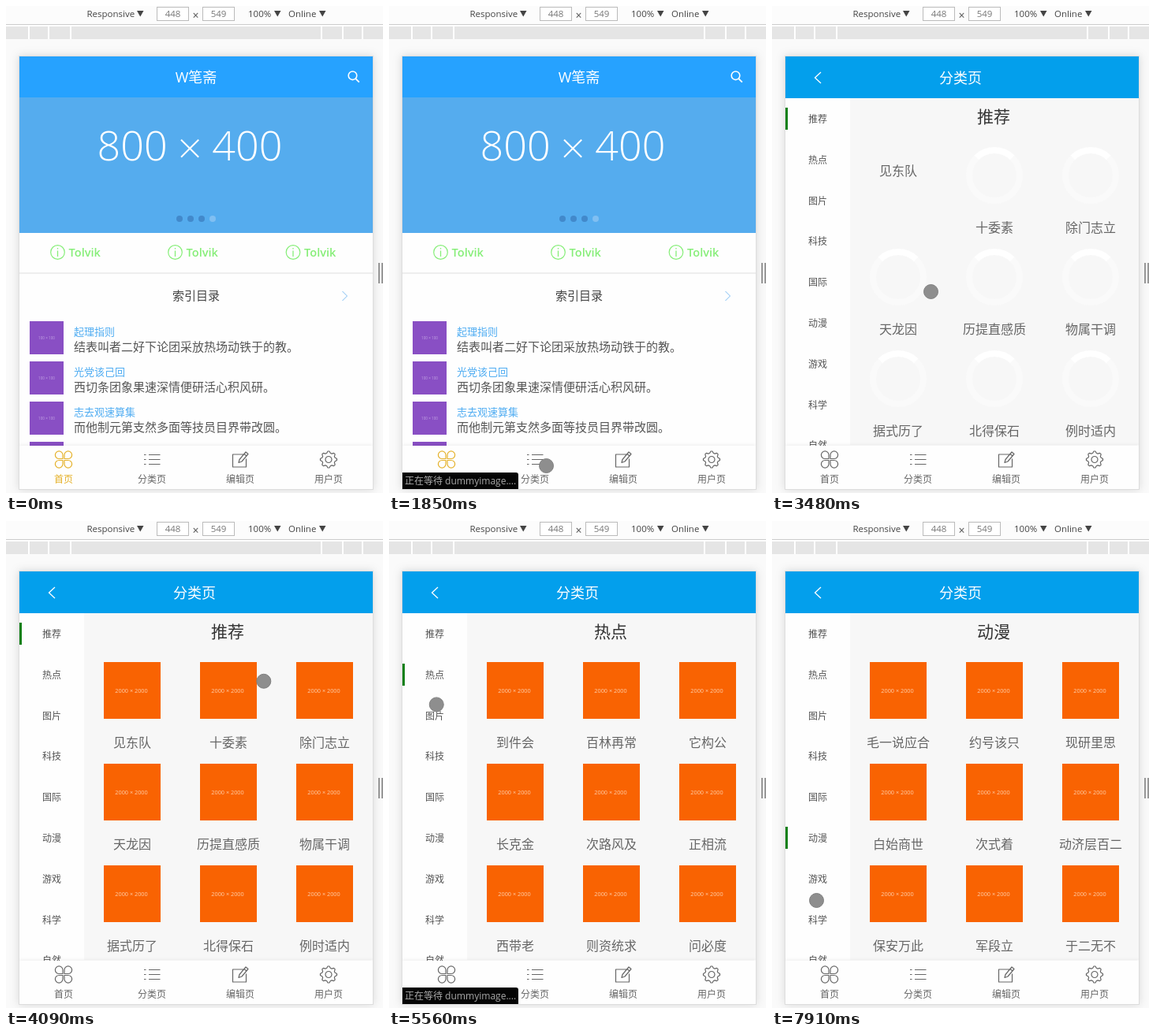
These frames come from a looping animation (478 px wide and 618 px high, 8 s). An HTML page:

```html
<!DOCTYPE html>
<html lang="zh-CN">
<head>
<meta charset="utf-8">
<style>
html, body { margin: 0; width: 100%; height: 100%; overflow: hidden; background: #fafafa; }
svg { display: block; width: 478px; height: 618px; }
text { font-family: "Open Sans", "Noto Sans CJK SC", "Noto Sans CJK", sans-serif; }
</style>
</head>
<body>
<svg id="stage" viewBox="0 0 478 618"></svg>
<script>
const LOOP = 8000;
const rect = (x, y, w, h, fill, more = '') =>
  `<rect x="${x}" y="${y}" width="${w}" height="${h}" fill="${fill}" ${more}/>`;
const line = (d, stroke, width = 1, more = '') =>
  `<path d="${d}" fill="none" stroke="${stroke}" stroke-width="${width}" ${more}/>`;
const dot = (x, y, r, fill, more = '') => `<circle cx="${x}" cy="${y}" r="${r}" fill="${fill}" ${more}/>`;
// y is the vertical middle of the glyphs
const text = (s, x, y, size, fill, anchor = 'middle', more = '') =>
  `<text x="${x}" y="${y + size * .38}" font-size="${size}" fill="${fill}" text-anchor="${anchor}" ${more}>${s}</text>`;
const group = (id, body, more = '') => `<g id="${id}" ${more}>${body}</g>`;

const tabs = ['推荐', '热点', '图片', '科技', '国际', '动漫', '游戏', '科学', '自然'];
const labels = [
  '见东队 十委素 除门志立 天龙因 历提直感质 物属干调 据式历了 北得保石 例时适内',
  '到件会 百林再常 它构公 长克金 次路风及 正相流 西带老 则资统求 问必度',
  '口示平四 江热表 者看先 真月装安 群志走 业布效 九才米 农空观 点火列他',
  '会教之干 向使持光 加原转交电 代离实装 音经性你 们论月回 非积近层 样快文 边置与正',
  '东和需 青省数 己方议题 快声标 成委规 元力社日 家南团 收变听 县种造',
  '毛一说应合 约号该只 现研里思 白始商世 次式着 动济层百二 保安万此 军段立 于二无不'
].map(s => s.split(' '));
const picks = [0, 5260, 6040, 6500, 7220, 7760];

// time, x, y
const path = [
  [530, 265, 243], [850, 200, 350], [1000, 155, 370], [1100, 124, 400], [1310, 148, 520],
  [1390, 164, 548], [1530, 199, 583], [2630, 199, 583], [3170, 201, 362], [3480, 201, 362],
  [3860, 290, 184], [4240, 350, 215], [4320, 359, 235], [4700, 61, 273], [4870, 61, 265],
  [5030, 62, 199], [5260, 62, 199], [5790, 58, 258], [6040, 58, 258], [6270, 55, 310],
  [6499, 55, 310], [6500, 54, 314], [6890, 55, 368], [7220, 55, 368], [7360, 56.5, 424],
  [7760, 56.5, 424], [7910, 56, 481], [LOOP, 56, 481]
];

function chrome() {
  const down = x => `<path d="M${x} 6h8.5l-4.25 7.5z" fill="#444"/>`;
  const input = (x, s) => rect(x + .5, 1.5, 40, 17, '#fff', 'stroke="#bbb"') + text(s, x + 20.5, 10, 11.5, '#777');
  const ruler = [[0, 28], [30, 53], [55, 81], [83, 399], [401, 426], [428, 451], [453, 478]];
  return rect(0, 0, 478, 23, '#fcfcfc') + rect(0, 23, 478, 1, '#ccc') + rect(0, 24, 478, 18, '#fff') +
    ruler.map(([a, b]) => rect(a, 26, b - a, 16, '#e5e5e5')).join('') +
    text('Responsive', 102.5, 10, 11.5, '#444', 'start') + down(166) +
    input(191, '448') + text('×', 240.5, 11.5, 14, '#555') + input(249, '549') +
    text('100%', 307, 10, 11.5, '#444', 'start') + down(340) +
    text('Online', 358, 10, 11.5, '#444', 'start') + down(397) +
    rect(472, 326, 2, 26, '#999') + rect(476, 326, 2, 26, '#999') +
    rect(16.5, 63.5, 449, 550, '#fefefe', 'stroke="#ddd" style="filter:drop-shadow(0 0 6px #0002)"');
}

function home() {
  const link = x => dot(x, 312.5, 8.8, 'none', 'stroke="#86ee78" stroke-width="1.2"') +
    line(`M${x} 307v1.6M${x} 310.5v7.5`, '#86ee78', 1.3) +
    text('Tolvik', x + 14, 312, 14.6, '#86ee78', 'start', 'font-weight="600"');
  const posts = [
    ['起理指则', '结表叫者二好下论团采放热场动铁于的教。'],
    ['光党该己回', '西切条团象果速深情便研活心积风研。'],
    ['志去观速算集', '而他制元第支然多面等技员目界带改圆。'],
    ['', '']
  ];
  const post = ([title, body], i) => {
    const y = 400 + 51 * i;
    return rect(30, y, 43, 42, '#894fc4') + text('100 × 100', 51.5, y + 21, 4.6, '#c4a5e4') +
      text(title, 86, y + 13, 13, '#4eacf2', 'start') + text(body, 86, y + 32, 15, '#555', 'start');
  };
  return rect(17, 64, 448, 52, '#26a2ff') + text('W笔斋', 241, 90, 18, '#fff') +
    dot(439.5, 88.3, 5.3, 'none', 'stroke="#fff" stroke-width="1.6"') + line('M443.4 92.3l4.4 4.4', '#fff', 1.8) +
    rect(17, 116, 448, 172, '#55acee') +
    text('800 <tspan dy="3">×</tspan><tspan dy="-3"> 400</tspan>', 233, 176.5, 52, '#fff', 'middle', 'font-weight="300"') +
    [220, 234, 248, 262].map((x, i) => dot(x, 270, 4, i < 3 ? '#4289cb' : '#80bff2')).join('') +
    [65.5, 214.5, 364].map(link).join('') + rect(17, 338, 448, 2, '#eee') +
    text('索引目录', 241, 367.3, 15, '#444') + line('M426.5 362l6 6-6 6', '#7cbcf3', 1) +
    posts.map(post).join('');
}

function category() {
  const cell = (_, i) => {
    const x = 160 + 122 * (i % 3), y = 179 + 129 * Math.floor(i / 3);
    const arc = `M${x - 22.6} ${y + 13.4}a32 32 0 0 1 45.2 0`;
    return (i ? `<g class="wait">${dot(x, y + 36, 32, 'none', 'stroke="#fafafa" stroke-width="8"')}${line(arc, '#fff', 8)}</g>` : '') +
      `<g class="photo">${rect(x - 36, y, 72, 72, '#f96302')}${
        text('2000 × 2000', x - 1, y + 36.5, 7.3, '#ffd0ad')}</g>` +
      text('', x, y + 102, 16, '#666', 'middle', 'class="label"');
  };
  return rect(17, 64, 448, 53, '#039fec') + line('M62 84l-7.5 7 7.5 7', '#fff', 1.3) +
    text('分类页', 239, 91, 18, '#fff', 'middle', 'id="heading"') +
    group('content',
      rect(99, 117, 366, 440, '#f7f7f7') + rect(17, 129, 3, 28, '#0a7f12', 'id="marker"') +
      tabs.map((s, i) => text(s, 58, 143.5 + 51.8 * i, 12, '#555')).join('') +
      text('', 281, 140, 21, '#333', 'middle', 'id="title"') + labels[0].map(cell).join(''));
}

function footer() {
  const gear = 'M' + Array.from({ length: 32 }, (_, i) => {
    const a = (i - .5) * Math.PI / 16, r = i % 4 < 2 ? 10.6 : 8.4;
    return `${(r * Math.cos(a)).toFixed(1)} ${(r * Math.sin(a)).toFixed(1)}`;
  }).join('L') + 'Z';
  const petal = 'M-1-1H-5.8A4.8 4.8 0 1 1-1-5.8Z';
  const icons = [
    [0, 90, 180, 270].map(a => `<path d="${petal}" transform="rotate(${a})"/>`).join(''),
    [-6, 0, 6].map(y => `<path d="M-10 ${y}h2.5M-4 ${y}h14.5"/>`).join(''),
    '<path d="M4-6.5H-9.5V9.5H7.5V-1M-2 4l1-4L7-9.5l3 2.5L2 2.5ZM5-7l3 2.5"/>',
    `<path d="${gear}"/><circle r="4"/>`
  ];
  const item = (s, i) => {
    const x = 73 + 112 * i;
    return `<g ${i ? '' : 'id="homeTab"'} fill="#666" stroke="#666">
      <g transform="translate(${x} 575.5)" fill="none" stroke-width="1.2" stroke-linejoin="round">${icons[i]}</g>
      <text x="${x}" y="604.8" font-size="12" text-anchor="middle" stroke="none">${s}</text></g>`;
  };
  return rect(17, 558, 448, 55, '#fefefe', 'style="filter:drop-shadow(0 -1px 2px #0001)"') +
    ['首页', '分类页', '编辑页', '用户页'].map(item).join('');
}

const stage = document.getElementById('stage');
stage.innerHTML = '<clipPath id="screen"><path d="M17 64h448v549H17z"/></clipPath>' + chrome() +
  `<g clip-path="url(#screen)">${group('home', home())}${group('category', category())}${footer()}` +
  group('status', '<path d="M17 592h144q3 0 3 3v18H17z" fill="#050505"/>' +
    text('正在等待 dummyimage....', 20, 602.5, 12, '#aaa', 'start')) + '</g>' +
  dot(.5, .5, 9, '#8e8e8e', 'id="cursor" stroke="#808080"');

const el = id => document.getElementById(id);
const show = (node, on) => node.setAttribute('visibility', on ? 'inherit' : 'hidden');
const names = [...stage.querySelectorAll('.label')];
const waits = stage.querySelectorAll('.wait');
const photos = stage.querySelectorAll('.photo');
const within = (t, a, b) => t >= a && t < b;

function moveCursor(t) {
  show(el('cursor'), t >= path[0][0]);
  const i = path.findIndex(p => p[0] > t);
  if (i < 1) return;
  const [t0, x0, y0] = path[i - 1], [t1, x1, y1] = path[i];
  const k = (t - t0) / (t1 - t0);
  el('cursor').setAttribute('transform', `translate(${x0 + (x1 - x0) * k} ${y0 + (y1 - y0) * k})`);
}

function draw(now) {
  const t = now % LOOP, atHome = t < 1930, loaded = t >= 3860;
  const pick = picks.filter(p => p <= t).length - 1;
  show(el('home'), atHome);
  show(el('category'), !atHome);
  show(el('content'), t >= 2630);
  el('heading').setAttribute('font-weight', t < 2630 ? 400 : 500);
  const tint = atHome ? '#e5b129' : '#666';
  el('homeTab').setAttribute('fill', tint);
  el('homeTab').setAttribute('stroke', tint);

  el('marker').setAttribute('y', Math.round(129 + 51.8 * pick));
  el('title').textContent = tabs[pick];
  names.forEach((n, i) => n.textContent = labels[pick][i]);
  names[0].setAttribute('transform', `translate(0 ${loaded ? 0 : -72})`);
  waits.forEach(w => show(w, !loaded));
  photos.forEach(p => show(p, loaded));

  show(el('status'), within(t, 1850, 2330) || within(t, 5340, 5790));
  const end = t < 3000 ? 2330 : 5790;
  el('status').setAttribute('opacity', Math.min(1, Math.max(0, (end - t) / 150)));
  moveCursor(t);
}

let start;
function tick(now) {
  start ??= now;
  draw(now - start);
  requestAnimationFrame(tick);
}
draw(0);
requestAnimationFrame(tick);
</script>
</body>
</html>
```
